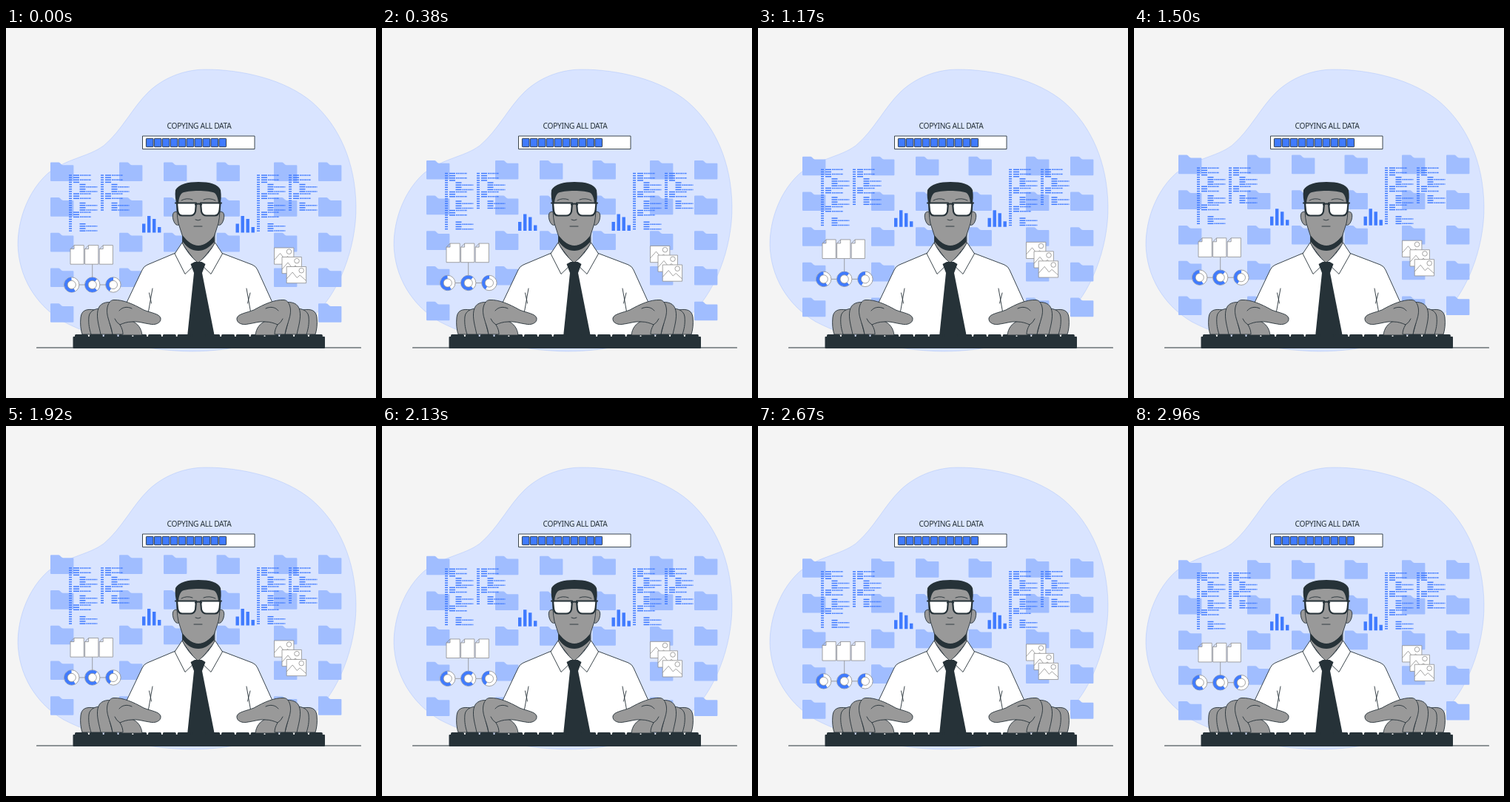
An HTML page for the animation above (3 s loop, 500 by 500 pixels).

```html
<!DOCTYPE html>
<html lang="en">
<head>
<meta charset="utf-8">
<style>
  html, body { margin: 0; width: 100%; height: 100%; overflow: hidden; background: #f4f4f4; }
  svg { display: block; width: 100vw; height: 100vh; }
  text {
    font: 300 15px "Noto Sans ExtraCondensed", "Noto Sans", "Open Sans", sans-serif;
    font-stretch: extra-condensed; letter-spacing: -.03em; fill: #263238; text-anchor: middle;
  }
  .ink { fill: #263238; }
  .line { fill: none; stroke: #263238; stroke-width: .9; stroke-linecap: round; stroke-linejoin: round; }
  .skin { fill: #999; stroke: #263238; stroke-width: .9; stroke-linejoin: round; }
  .white { fill: #fff; stroke: #263238; stroke-width: .9; stroke-linejoin: round; }
  .paper { fill: #fff; stroke: #8c8c8c; stroke-width: .8; stroke-linejoin: round; }
  .blue { fill: #407bff; }
  .folder { fill: #a0bdff; }
</style>
</head>
<body>
<svg viewBox="0 0 500 500">
  <defs>
    <path id="folder" d="M0 1Q0 0 1 0H11Q12 0 13 1L15 3Q16 3.8 17 3.8H30.4Q31.4 3.8 31.4 4.8V24.6Q31.4 25.6 30.4 25.6H1Q0 25.6 0 24.6Z"/>
    <path id="doc" class="paper" d="M0 5L5 0H18.2V25.6H0ZM0 5H5V0"/>
    <g id="photo" class="paper">
      <path d="M0 0H26.4V22.2H0ZM0 16.5L8 7.5L14 15L18 11.5L26.4 19"/>
      <circle cx="20" cy="5.2" r="3.3"/>
    </g>
    <path id="bars" class="blue" d="M0 264.5h4.4V276.5H0ZM7 254h4.4V276.5H7ZM14 258h4.4V276.5H14ZM21 269h4.4V276.5H21Z"/>
    <g id="hand" class="skin">
      <path d="M146 385L156 415H184C183 406 178 399 170 396Z"/>
      <path d="M120 381C108 379 102 382 101 391C100 400 101 408 103 414H116L114 398L122 390Z"/>
      <path d="M136 380C124 377 113 381 112 390C111 400 113 408 115 414H130L126 398L138 390Z"/>
      <path d="M148 371C134 369 126 372 124 382C122 392 126 404 128 414H144L140 398L150 390Z"/>
      <path d="M146 367.500C158 367 172 373 186 381C196 385 207 386 209 392C210 399 201 402 194 400C186 399 178 396 170 397C164 397 158 399 154 401C157 406 158 410 158 414H144C143 406 140 400 138 392C136 385 136 379 138 374C140 369 143 367.500 146 367.500Z"/>
      <path class="line" d="M153 382C157 377 164 376 170 379M154 401Q149 398 147 393"/>
    </g>
  </defs>

  <path fill="#d9e4ff" stroke="#407bff" stroke-opacity=".35" stroke-width=".5"
    d="M270 56C238 56 211 69 193 86C171 107 157 138 132 159C112 174 82 176 57 196C31 219 16 257 16 293C17 335 39 374 78 397C126 422 190 436 250 437C312 437 375 420 413 391C449 362 474 297 473 240C472 182 451 133 414 100.500C377 69 318 56 270 56Z"/>

  <text id="title" x="261">COPYING ALL DATA</text>
  <rect class="white" x="184.500" y="146" width="151.500" height="17.600"/>
  <g id="progress" class="blue" stroke="#263238" stroke-width=".9"></g>

  <g id="float">
    <g id="folders" class="folder"></g>
    <g id="code" fill="none" stroke="#407bff" stroke-width="1.500"></g>
    <use href="#bars" x="184"/><use href="#bars" x="310.500"/>
    <path class="paper" d="M116.700 319V347M88.500 347H145"/>
    <use href="#doc" x="87" y="293.600"/><use href="#doc" x="106.600" y="293.600"/><use href="#doc" x="126.200" y="293.600"/>
    <g id="rings"></g>
    <use href="#photo" x="362.500" y="297"/><use href="#photo" x="373" y="309.500"/><use href="#photo" x="379.200" y="322.500"/>
  </g>

  <!-- shirt -->
  <path class="white" d="M229 304L191 320Q186 322 184 327L163 371L158 386V418H364V386L360 371L340 327Q338 322 333 320L291 304Z"/>
  <path class="line" d="M198 352L192 386M193.500 358L196.500 372M325 352L331 386M330 358L326.500 372"/>
  <!-- neck and collar -->
  <path class="skin" d="M238.500 268V292L259.500 320L282 292V268Z"/>
  <path class="white" d="M238 290L228 305L242 332.500L258.500 316.500Q246 306 238 290ZM282.500 290L292.500 305L277 332.500L260.500 316.500Q274 306 282.500 290Z"/>
  <path class="ink" d="M249.500 319L255 316H264.500L269.500 319L265 331L282 417H245L254 331Z"/>
  <!-- head -->
  <path class="skin" d="M233 249C226 246 224 252 226 259C228 266 232 268 235 265ZM287 249C294 246 296 252 294 259C292 266 288 268 285 265Z"/>
  <path class="skin" stroke-width=".9" d="M231 226Q230 250 233 264L238.500 281C245 289 252 295 260 295C268 295 275 289 281.500 281L287 264Q290 250 289 226Q276 212 259 212Q242 212 231 226Z"/>
  <path class="ink" d="M239 281C246 289 252 294 260 294C268 294 274 289 281.500 281V289C274 297 268 301 260 301C251 301 245 297 239 289Z"/>
  <path class="ink" d="M231 240C229 233 228 226 229 219C233 211 246 208 260 208C275 208 287 211 290 219C291 226 291 233 289 240H287C287 233 286 227 282 223C275 219 245 219 238 223C234 227 233 233 233 240Z"/>
  <path class="line" d="M237 233Q244 229 252 232M267 232Q275 229 283 233M254 268H265M256 259Q259.500 261 263 259"/>
  <path d="M231 236.500H257L256 248Q254.500 253.500 249 253.500H238Q233 253.500 232 247ZM263 236.500H289.500L288.500 247Q287 253.500 282 253.500H271Q265.500 253.500 264 248Z" fill="#fff" stroke="#263238" stroke-width="2.200" stroke-linejoin="round"/>
  <path class="line" style="stroke-width:2.200" d="M229 236.500H232M256 238.500Q260 236.500 264 238.500M288 236.500H291"/>

  <!-- desk -->
  <path class="line" style="stroke-width:1.100" d="M41.500 432H479.500"/>
  <g id="keys" class="ink"></g>
  <rect class="ink" x="90.500" y="417" width="340.500" height="16" rx="1"/>
  <use href="#hand"/>
  <use href="#hand" transform="matrix(-1 0 0 1 521 0)"/>
</svg>
<script>
  const $ = id => document.getElementById(id);
  const repeat = (n, draw) => Array.from({ length: n }, (_, i) => draw(i)).join('');

  // Pick the type size that gives the title its line length in the available font
  const title = $('title');
  const size = Math.min(16, 15 * 87 / title.getComputedTextLength());
  title.style.fontSize = size + 'px';
  title.setAttribute('y', 132 + size * .36);

  $('progress').innerHTML = repeat(10, i =>
    `<rect x="${189.4 + i * 10.95}" y="149.3" width="9.6" height="11.4" rx=".8"/>`);

  $('keys').innerHTML = repeat(17, i =>
    `<rect x="${93 + i * 19.8}" y="414" width="18" height="6" rx="1.5"/>`);

  $('folders').innerHTML = [60, 153, 213, 284.5, 362, 422].map(x =>
    repeat(5, i => `<use href="#folder" x="${x}" y="${181.4 + i * 47.7}"/>`)).join('');

  // One letter per code line: a = flush, b = indented, capital = with a dotted tail, . = number only
  const block = (x, rows) => [...rows].map((kind, i) => {
    const y = 199 + i * 3.13;
    const start = /b/i.test(kind) ? x + 14.5 : x + 6;
    let out = `<path d="M${x} ${y}h4"/>`;
    if (kind !== '.') out += `<path d="M${start} ${y}h8"/>`;
    if (/[AB]/.test(kind))
      out += `<path d="M${start + 9} ${y}h15" stroke-dasharray="1.8 .6"/>`;
    return out;
  }).join('');
  $('code').innerHTML = [85, 339].map(x =>
    block(x, 'AaAabBbBAaA.bBbBAaA..bBbB') + block(x + 43, 'AaAabBbBAaA.bBbB')).join('');

  // Blue share of each ring, clockwise from the given angle
  const ring = (x, from, share) => `
    <circle class="paper" cx="${x}" cy="347" r="10.2"/>
    <circle cx="${x}" cy="347" r="7.7" fill="none" stroke="#407bff" stroke-width="4.6"
      pathLength="100" stroke-dasharray="${share} 100" transform="rotate(${from} ${x} 347)"/>
    <circle class="paper" cx="${x}" cy="347" r="5.6"/>`;
  $('rings').innerHTML = ring(88.7, 60, 58) + ring(116.7, 50, 72) + ring(144.9, 120, 42);

  const period = 3000, rise = 9.8;
  function frame() {
    const p = performance.now() % period / period;
    const y = -rise * (1 - Math.abs(1 - 2 * p));
    $('float').setAttribute('transform', `translate(0 ${y})`);
    requestAnimationFrame(frame);
  }
  frame();
</script>
</body>
</html>
```
